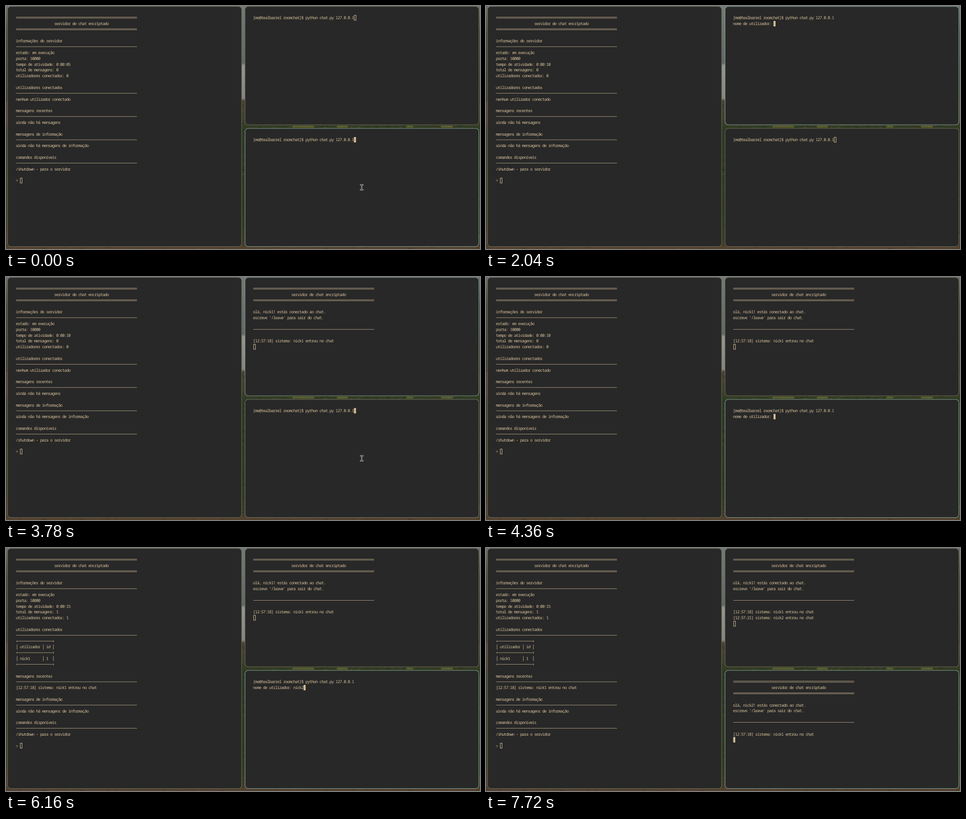
An HTML page with a canvas for the animation above (8 s loop, 1046 by 536 pixels).

```html
<!DOCTYPE html>
<html lang="pt">
<head>
<meta charset="utf-8">
<title>roomchat</title>
<style>
  html, body { margin: 0; width: 100%; height: 100%; overflow: hidden; background: #282828; }
  canvas { display: block; }
</style>
</head>
<body>
<canvas id="stage" width="1046" height="536"></canvas>
<script>
const LOOP = 8000, W = 1046, H = 536;
const CELL = 4.445, ROW = 12.83;
const TEXT = '#d4be98', PANEL = '#282828';
const IDLE = [108, 107, 88], ACTIVE = [131, 165, 152];

const ctx = document.getElementById('stage').getContext('2d');

// Terminal windows: outer box plus the left edge and middle line of the first text row
const SERVER = { x: 3.5, y: 1, w: 516.5, h: 529.5, left: 22.3, top: 26 };
const UPPER = { x: 527.5, y: 1, w: 516, h: 261, left: 545.6, top: 26 };
const LOWER = { x: 527.5, y: 270, w: 516, h: 260.5, left: 545.6, top: 295.2 };

const THICK = '═'.repeat(60), THIN = '─'.repeat(60);
const TITLE = [THICK, ' '.repeat(19) + 'servidor de chat encriptado', THICK, ''];
const COMMAND = '[me@tealbarrel roomchat]$ python chat.py 127.0.0.1';
const ASK = 'nome de utilizador: ';
const joined = (clock, name) => `[${clock}] sistema: ${name} entrou no chat`;
const FIRST = joined('12:57:18', 'nick1');
const SECOND = joined('12:57:21', 'nick2');

const FOCUS_UP = 1090, FOCUS_DOWN = 3650, GUEST_IN = 6570;
const LOGIN_UP = { name: 'nick1', enter: 1840, ask: 2040, keys: [2700, 2780, 2860, 2940, 3020], done: 3250 };
const LOGIN_DOWN = { name: 'nick2', enter: 4160, ask: 4360, keys: [5350, 5430, 5510, 5590, 5730], done: GUEST_IN };

function section(heading, body) {
  return [heading, THIN, ...body, ''];
}

function serverLines(t) {
  const uptime = t < 1160 ? '05' : t < 6160 ? '10' : '15';
  const count = t < 6160 ? 0 : 1;
  const edge = '+' + '─'.repeat(17) + '+';
  const table = [edge, '| utilizador | id |', edge, '| nick1      | 1  |', edge];
  return [
    ...TITLE,
    ...section('informações do servidor', [
      'estado: em execução',
      'porta: 10000',
      'tempo de atividade: 0:00:' + uptime,
      'total de mensagens: ' + count,
      'utilizadores conectados: ' + count
    ]),
    ...section('utilizadores conectados', count ? table : ['nenhum utilizador conectado']),
    ...section('mensagens recentes', [count ? FIRST : 'ainda não há mensagens']),
    ...section('mensagens de informação', ['ainda não há mensagens de informação']),
    ...section('comandos disponíveis', ['/shutdown - para o servidor']),
    '> '
  ];
}

function clientLines(t, login, messages) {
  if (t < login.enter) return [COMMAND];
  if (t < login.ask) return [COMMAND, ''];
  if (t < login.done) {
    const typed = login.keys.filter(key => t >= key).length;
    return [COMMAND, ASK + login.name.slice(0, typed)];
  }
  return [
    ...TITLE,
    `olá, ${login.name}! estás conectado ao chat.`,
    "escreve '/leave' para sair do chat.",
    '', THIN, '',
    ...messages, ''
  ];
}

function drawLine(line, left, middle) {
  for (const run of line.matchAll(/═+|─+/g)) {
    const x = left + run.index * CELL, width = run[0].length * CELL;
    const offsets = run[0][0] === '═' ? [-1.9, 0.5] : [-0.7];
    for (const dy of offsets) ctx.fillRect(x, middle + dy, width, 0.75);
  }
  [...line].forEach((char, col) => {
    const x = left + (col + 0.5) * CELL;
    if (char === '|') ctx.fillRect(x - 0.4, middle - 5.5, 0.8, 11);
    else if (!' ═─'.includes(char)) ctx.fillText(char, x, middle + 3);
  });
}

function drawTerminal(win, lines, glow, focused) {
  ctx.beginPath();
  ctx.roundRect(win.x, win.y, win.w, win.h, 7);
  ctx.fillStyle = PANEL;
  ctx.fill();
  const rgb = IDLE.map((c, i) => Math.round(c + (ACTIVE[i] - c) * glow));
  ctx.strokeStyle = `rgb(${rgb})`;
  ctx.lineWidth = 1.1;
  ctx.stroke();

  ctx.fillStyle = ctx.strokeStyle = TEXT;
  ctx.font = '9px "Noto Sans Mono", "DejaVu Sans Mono", monospace';
  ctx.fontStretch = 'extra-condensed';
  ctx.textAlign = 'center';
  ctx.textRendering = 'geometricPrecision';
  lines.forEach((line, row) => drawLine(line, win.left, win.top + row * ROW));

  const x = win.left + lines.at(-1).length * CELL;
  const y = Math.round(win.top + (lines.length - 1) * ROW - 6.2);
  ctx.lineWidth = 1;
  if (focused) ctx.fillRect(x, y, CELL, 12);
  else ctx.strokeRect(Math.round(x) + 0.5, y + 0.5, 4, 11);
}

function drawPointer(x, y) {
  ctx.beginPath();
  for (const end of [-5.5, 5.5]) {
    ctx.moveTo(x - 2.5, y + end);
    ctx.lineTo(x + 2.5, y + end);
  }
  ctx.moveTo(x, y - 5.5);
  ctx.lineTo(x, y + 5.5);
  ctx.lineCap = 'square';
  for (const [width, color] of [[2.4, '#cccccc'], [0.9, '#222222']]) {
    ctx.lineWidth = width;
    ctx.strokeStyle = color;
    ctx.stroke();
  }
}

// Blurred landscape that only shows in the gaps between windows
function paintWallpaper() {
  const canvas = document.createElement('canvas');
  canvas.width = W;
  canvas.height = H;
  const c = canvas.getContext('2d');

  function fade(x, y, w, h, stops) {
    const gradient = c.createLinearGradient(0, y, 0, y + h);
    stops.forEach(([at, color]) => gradient.addColorStop(at, color));
    c.fillStyle = gradient;
    c.fillRect(x, y, w, h);
  }

  fade(0, 0, W, H, [[0, '#727b75'], [0.235, '#5f6965'], [0.245, '#92958f'], [0.38, '#85877f'],
    [0.39, '#4b4030'], [0.47, '#40402a'], [0.51, '#2c3a22'], [0.9, '#303a20'], [1, '#4b3c2d']]);
  const trees = [[0, '#66706a'], [0.3, '#454b3e'], [1, '#3d3b2c']];
  fade(0, 0, 4, 210, trees);
  fade(W - 4, 0, 4, 210, trees);

  let seed = 7;
  const random = () => (seed = seed * 16807 % 2147483647) / 2147483647;
  const tones = ['#22331d', '#33452a', '#4f5029', '#443426', '#262b20', '#2c4428'];
  c.globalAlpha = 0.5;
  for (let i = 0; i < 9000; i++) {
    c.fillStyle = tones[Math.floor(random() * tones.length)];
    c.fillRect(random() * W, 206 + random() * 330, 2 + random() * 8, 1 + random() * 2);
  }
  c.fillStyle = '#858139';
  for (const [x, width] of [[632, 48], [730, 24], [884, 14], [960, 26]]) c.fillRect(x, 264, width, 4);
  c.globalAlpha = 0.35;
  c.fillStyle = '#6b4a38';
  c.fillRect(0, 530, W, 6);
  c.fillRect(0, 210, 4, 320);
  return canvas;
}

const wallpaper = paintWallpaper();
const progress = (t, start) => Math.min(1, Math.max(0, (t - start) / 500));

function draw(t) {
  const glow = progress(t, FOCUS_UP) - progress(t, FOCUS_DOWN);
  const upFocused = t >= FOCUS_UP && t < FOCUS_DOWN;
  ctx.drawImage(wallpaper, 0, 0);
  drawTerminal(SERVER, serverLines(t), 0, false);
  drawTerminal(UPPER, clientLines(t, LOGIN_UP, t < GUEST_IN ? [FIRST] : [FIRST, SECOND]), glow, upFocused);
  drawTerminal(LOWER, clientLines(t, LOGIN_DOWN, [FIRST]), 1 - glow, !upFocused);

  // The pointer hides as soon as a key is pressed
  if (upFocused) {
    if (t < LOGIN_UP.enter) drawPointer(785, 131.5);
  } else if (t < LOGIN_DOWN.enter) {
    drawPointer(785, 400);
  }
}

const start = performance.now();
function tick() {
  draw((performance.now() - start) % LOOP);
  requestAnimationFrame(tick);
}
tick();
</script>
</body>
</html>
```
